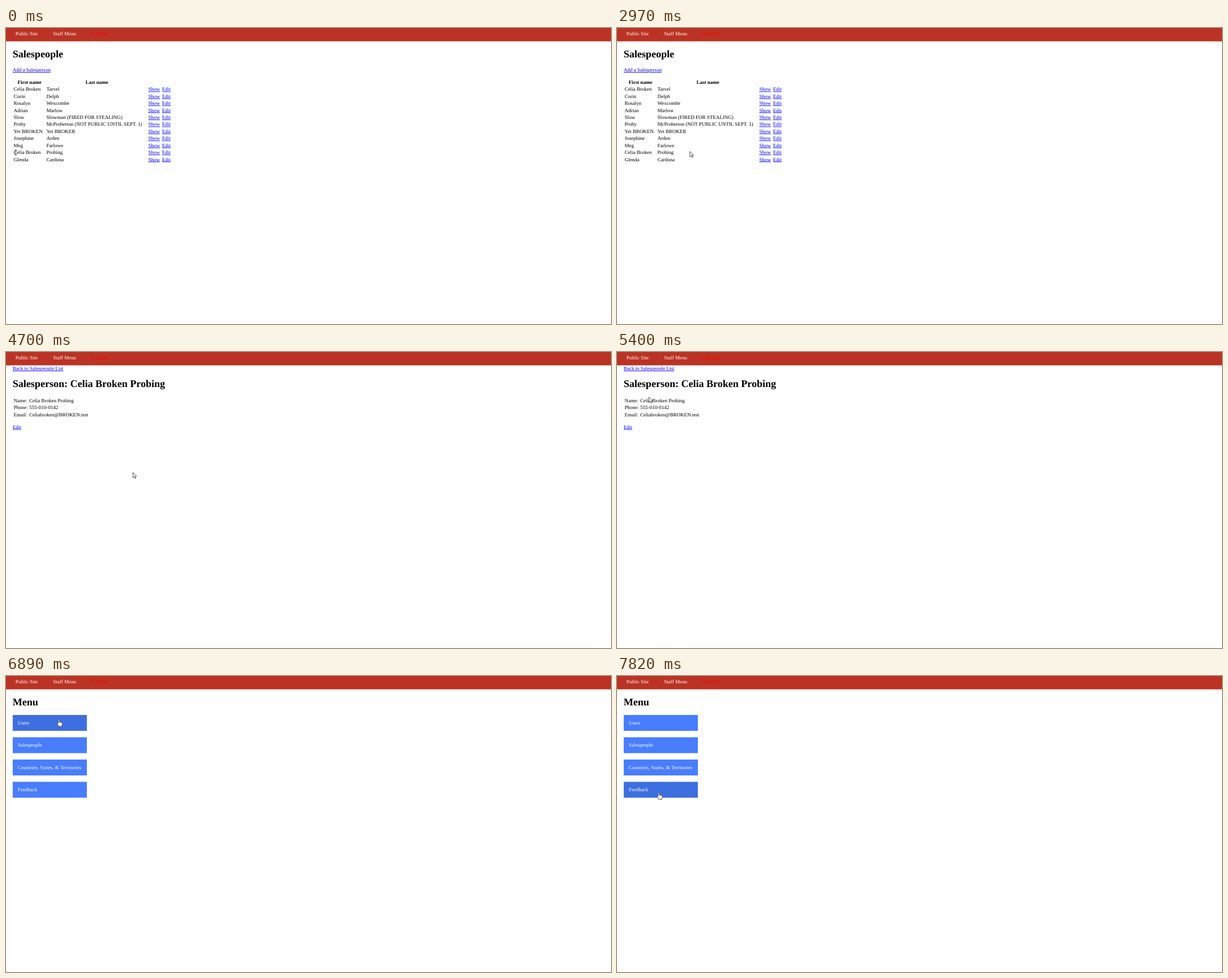
Write an HTML page that moves like this. It is 1069 px wide and 524 px high and loops after 8 s.

```html
<!DOCTYPE html>
<html lang="en">
<head>
<meta charset="utf-8">
<title>Staff pages</title>
<style>
  html, body { margin: 0; width: 100%; height: 100%; overflow: hidden; background: #fefefe; }
  svg { display: block; width: 1069px; height: 524px; }
  text { font: 9.02px "Liberation Serif", "Times New Roman", serif; text-rendering: geometricPrecision; }
  .h1 { font-size: 18.04px; font-weight: bold; }
  .th { font-weight: bold; text-anchor: middle; }
  .link { fill: #00e; text-decoration: underline; }
  .light { fill: #fff; }
  .exit { fill: #f00; }
  .page, #cursor path { display: none; }
  .on, #cursor path.on { display: inline; }
  .button { fill: #487dfd; }
  .button.hover { fill: #3e6fe0; }
  #cursor path { fill: #fff; stroke: #2b2b35; stroke-width: .8; stroke-linejoin: round; }
</style>
</head>
<body>
<svg viewBox="0 0 1069 524">
  <rect width="1069" height="524" fill="#fefefe"/>
  <rect width="1069" height="23.6" fill="#bb3324"/>
  <g id="nav"></g>
  <g class="page"></g>
  <g class="page"></g>
  <g class="page"></g>
  <g id="cursor">
    <path id="arrow" d="M0 0V9.5L2.3 7.4 3.8 10.7 5.2 10.1 3.7 6.9H6.5Z"/>
    <path id="hand" d="M-1 7.6V1Q0-.4 1 1V5L5.5 6Q6.6 6.4 6.4 7.6L5.4 11.4V13H-.2V11.6L-3 8.4Q-3.1 6.8-1.7 7.1Z"/>
    <path id="beam" d="M-2-4.4H2M0-4.4V4.4M-2 4.4H2"/>
  </g>
</svg>
<script>
const LOOP = 8000;
const PITCH = 12.42;
const $ = id => document.getElementById(id);
const text = (x, y, str, cls = '') => `<text x="${x}" y="${y}" class="${cls}">${str}</text>`;

const people = [
  ['Celia Broken', 'Tarvel'], ['Corin', 'Delph'], ['Rosalyn', 'Wexcombe'],
  ['Adrian', 'Marlow'], ['Slow', 'Slowman (FIRED FOR STEALING)'],
  ['Proby', 'McProberton (NOT PUBLIC UNTIL SEPT. 1)'],
  ['Yet BROKEN', 'Yet BROKER'], ['Josephine', 'Arden'], ['Meg', 'Farlowe'],
  ['Celia Broken', 'Probing'], ['Glenda', 'Cardona'],
];
const details = [
  ['Name:', 'Celia Broken Probing'],
  ['Phone:', '555-010-0142'],
  ['Email:', 'Celiabroken@BROKEN.test'],
];
const menu = ['Users', 'Salespeople', 'Countries, States, &amp; Territories', 'Feedback'];

$('nav').innerHTML = text(16.7, 13, 'Public Site', 'light')
  + text(83.3, 13, 'Staff Menu', 'light') + text(150.6, 13, 'Log Out', 'exit');

const pages = [...document.querySelectorAll('.page')];

pages[0].innerHTML = text(11.8, 52, 'Salespeople', 'h1')
  + text(11.8, 77, 'Add a Salesperson', 'link')
  + text(41.5, 98.9, 'First name', 'th') + text(160.7, 98.9, 'Last name', 'th')
  + people.map(([first, last], i) => {
    const y = 111.3 + i * PITCH;
    return text(13.4, y, first) + text(71.4, y, last)
      + text(251.5, y, 'Show', 'link') + text(275.8, y, 'Edit', 'link');
  }).join('');

pages[1].innerHTML = text(11.8, 32, 'Back to Salespeople List', 'link')
  + text(11.8, 62.2, 'Salesperson: ' + details[0][1], 'h1')
  + details.map(([label, value], i) => {
    const y = 88.9 + i * PITCH;
    return text(13.4, y, label) + text(41.1, y, value);
  }).join('')
  + text(11.8, 135.6, 'Edit', 'link');

pages[2].innerHTML = text(11.8, 52, 'Menu', 'h1')
  + menu.map((label, i) => {
    const y = 69 + i * 39.45;
    return `<rect class="button" x="11.9" y="${y}" width="131" height="28.1"/>`
      + text(20.8, y + 17, label, 'light');
  }).join('');
const buttons = [...document.querySelectorAll('.button')];

// Screen refresh times: first, last, count
const ticks = [
  [0, 0, 1], [130, 1080, 8], [1200, 2140, 8], [2260, 3240, 8], [3390, 3540, 2],
  [3820, 4820, 8], [4970, 5930, 8], [6060, 7020, 8], [7140, 7820, 6],
].flatMap(([a, b, n]) =>
  Array.from({ length: n }, (_, i) => n > 1 ? a + (b - a) * i / (n - 1) : a));

// Pointer path: time, x, y, shape from then on
const path = [
  [0, 17, 220.5, 'beam'], [400, 38, 222, 'arrow'], [945, 86, 223, 'arrow'],
  [1080, 83.5, 221, 'arrow'], [1590, 170, 224.5, 'arrow'], [2130, 254, 211, 'hand'],
  [2390, 210, 214, 'arrow'], [2750, 8, 217, 'arrow'], [3200, 267, 220.3, 'hand'],
  [3540, 261.3, 220.3, 'hand'], [3830, 261.3, 220.3, 'arrow'], [4820, 218, 212, 'arrow'],
  [5390, 54, 77.7, 'arrow'], [5600, 35, 62, 'arrow'], [5900, 95, 13, 'hand'],
  [6580, 105.3, 12.3, 'hand'], [6740, 104, 16, 'arrow'], [6870, 95, 72, 'hand'],
  [7020, 75, 125, 'hand'], [7140, 37, 236, 'arrow'], [7412, 40, 271, 'arrow'],
  [7670, 70, 208, 'hand'], [7820, 73.8, 205.6, 'hand'],
];
const pageSteps = [[0, 0], [3815, 1], [6740, 2]];
const hoverSteps = [[0, -1], [6870, 0], [7015, 1], [7135, 3], [7260, -1], [7670, 3]];

const lastAt = (steps, t) => steps.findLastIndex(s => s[0] <= t);
const valueAt = (steps, t) => steps[lastAt(steps, t)][1];
const mark = (list, active, cls) =>
  list.forEach((el, i) => el.classList.toggle(cls, i === active));
const shapes = ['arrow', 'hand', 'beam'];

function draw(now) {
  const time = now % LOOP;
  const t = ticks.findLast(tick => tick <= time + .01);
  const k = lastAt(path, t);
  const a = path[k], b = path[k + 1] || a;
  const f = a === b ? 0 : (t - a[0]) / (b[0] - a[0]);
  const mix = i => a[i] + (b[i] - a[i]) * f;

  mark(pages, valueAt(pageSteps, t), 'on');
  mark(buttons, valueAt(hoverSteps, t), 'hover');
  mark(shapes.map($), shapes.indexOf(a[3]), 'on');
  $('cursor').setAttribute('transform', `translate(${mix(1)} ${mix(2)})`);
}

const start = performance.now();
function loop() {
  draw(performance.now() - start);
  requestAnimationFrame(loop);
}
loop();
</script>
</body>
</html>
```
